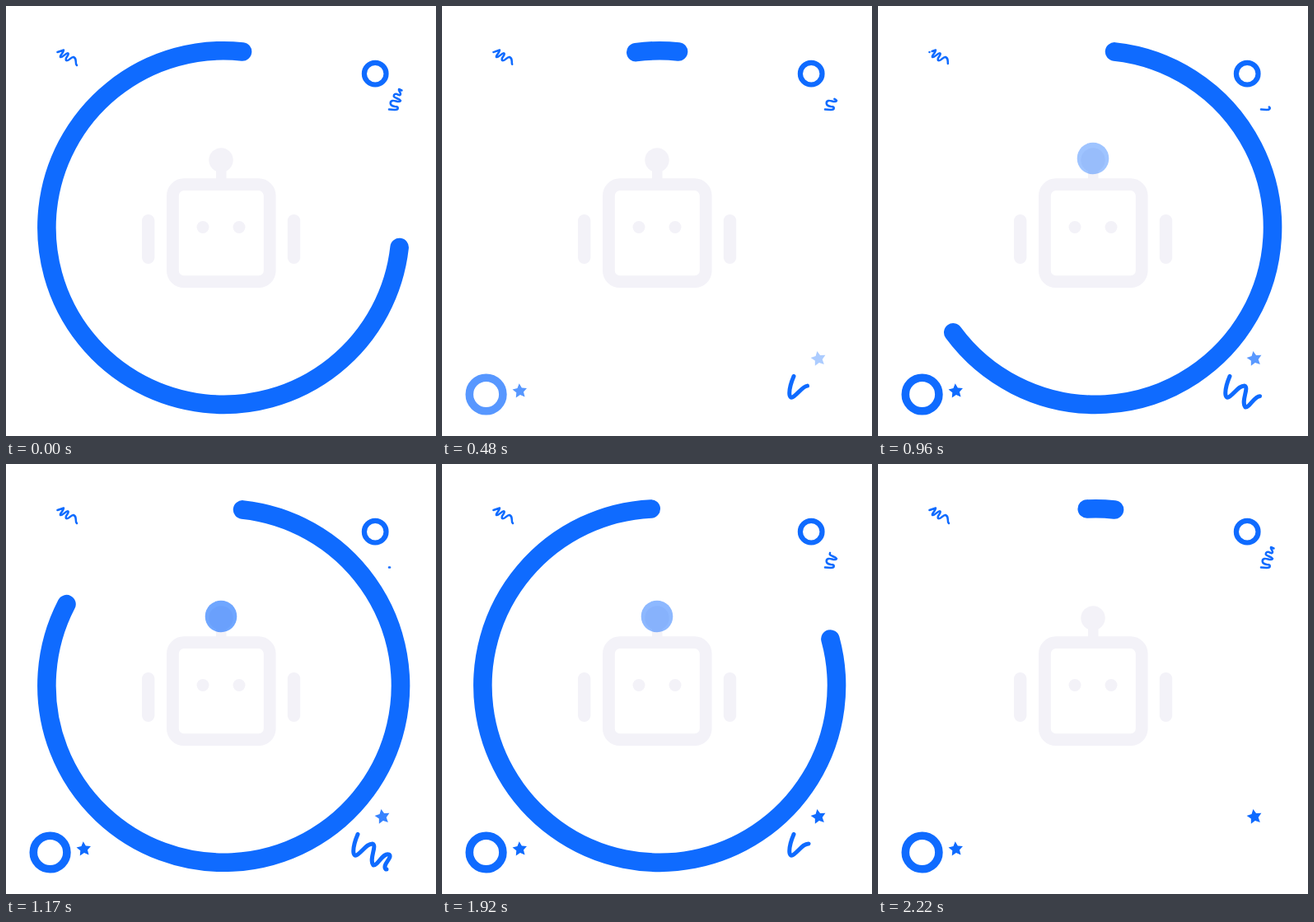
Write an HTML page that moves like this. It is 522x522 px and loops after 2250 ms.

```html
<!DOCTYPE html>
<html lang="en">
<head>
<meta charset="utf-8">
<title>Robot loader</title>
<style>
  html, body { margin: 0; width: 100%; height: 100%; overflow: hidden; background: #fff; }
  svg { display: block; width: 522px; height: 522px; }
  .line { fill: none; stroke: #0f6bff; stroke-linecap: round; stroke-linejoin: round; }
  .blue { fill: #0f6bff; }
  .robot { fill: #f3f2f8; }
</style>
</head>
<body>
<svg viewBox="0 0 522 522">
  <g class="robot">
    <rect x="202.4" y="216.7" width="117.8" height="118" rx="13.5" fill="none" stroke="#f3f2f8" stroke-width="14.8"/>
    <rect x="165" y="253" width="15.4" height="60" rx="7.7"/>
    <rect x="341.8" y="253" width="15.4" height="60" rx="7.7"/>
    <circle cx="239" cy="268.5" r="7.5"/>
    <circle cx="283" cy="268.5" r="7.5"/>
    <circle cx="261" cy="187" r="14.7"/>
    <rect x="255" y="198" width="12.5" height="12"/>
  </g>
  <circle id="lamp" class="blue" cx="261" cy="185" r="19.3"/>
  <path id="arc" class="line" stroke-width="22.6"/>
  <circle class="line" cx="448.2" cy="82.2" r="13.3" stroke-width="6.2"/>
  <g id="left">
    <circle class="line" cx="53.6" cy="471.5" r="20.3" stroke-width="9.6"/>
    <path id="starLeft" class="blue"/>
  </g>
  <path id="starRight" class="blue"/>
  <path id="waveTop" class="line" pathLength="1" stroke-width="2.5" d="M62.5 56L70 53.5C70 57 65 60 66 62C69 63 73 56 75.5 57.5C77 60 71 63 73 66C76 68 79 61 82 62C87 64 83 69 86 72"/>
  <path id="waveRight" class="line" pathLength="1" stroke-width="2.5" d="M465 125.5L472 126C477 126 477 122 472 122C465 121 466 116 469 115C472 114 477 118 479 115C478 112 469 112 471 108C474 104 478 111 479 107C479 104 476 103 477 101L480.5 102.5"/>
  <path id="waveBottom" class="line" pathLength="1" stroke-width="5" d="M427 449.5C420 466 420 479 427 474C434 469 438 461 445 461C451 463 440 480 446 487C451 488 458 471 465 474C470 478 456 486 461 492L464 492"/>
</svg>
<script>
const LOOP = 2250, GAP_RIGHT = 276.1, SWEEP = 351.1;
const $ = id => document.getElementById(id);
const clamp = x => Math.min(1, Math.max(0, x));
const ramp = (t, from, to) => clamp((t - from) / (to - from));

function point(cx, cy, r, deg) {
  const a = deg * Math.PI / 180;
  return `${(cx + r * Math.cos(a)).toFixed(2)} ${(cy + r * Math.sin(a)).toFixed(2)}`;
}

function star(cx, cy, r, turn) {
  const corners = Array.from({ length: 10 }, (_, i) => point(cx, cy, i % 2 ? r * 0.5 : r, turn + i * 36));
  return `M${corners.join('L')}Z`;
}

function drawArc(tail, head) {
  const at = deg => point(264.2, 269, 214.8, deg);
  $('arc').setAttribute('d', head - tail < 0.1 ? '' :
    `M${at(tail)}A214.8 214.8 0 ${head - tail > 180 ? 1 : 0} 1 ${at(head)}`);
}

function trim(id, start, end) {
  const { style } = $(id);
  style.visibility = end - start < 0.005 ? 'hidden' : 'visible';
  style.strokeDasharray = `0 ${start} ${end - start} 2`;
}

function render(t) {
  if (t < 495) {
    drawArc(Math.min(GAP_RIGHT, 5.9 + 0.533 * t), GAP_RIGHT);
  } else {
    const grow = 1 - (1 - ramp(t, 488, 1651)) ** 2;
    const erase = ramp(t, 1651, 2195) ** 2.33;
    const first = GAP_RIGHT - 360;
    drawArc(first + SWEEP * erase, t < 2190 ? first + SWEEP * grow : GAP_RIGHT);
  }
  $('lamp').style.opacity = ramp(t, 540, 1590) * (1 - ramp(t, 1590, 2220));
  $('left').style.opacity = ramp(t, 0, 690);
  $('starRight').style.opacity = ramp(t, 0, 1400);

  const dip = ramp(t, 400, 750) * (1 - ramp(t, 750, 1100));
  trim('waveTop', 0.14 * dip, 1 - 0.1 * dip);
  trim('waveRight', 0, 1 - ramp(t, 0, 1190) + ramp(t, 1190, 2210));
  trim('waveBottom', 0, ramp(t, 0, 1190) - ramp(t, 1250, 2210) ** 1.5);
}

$('starLeft').setAttribute('d', star(94.5, 467.5, 9.2, -95));
$('starRight').setAttribute('d', star(457, 428.3, 9.5, -100));

function frame(now) {
  render(now % LOOP);
  requestAnimationFrame(frame);
}
render(0);
requestAnimationFrame(frame);
</script>
</body>
</html>
```
